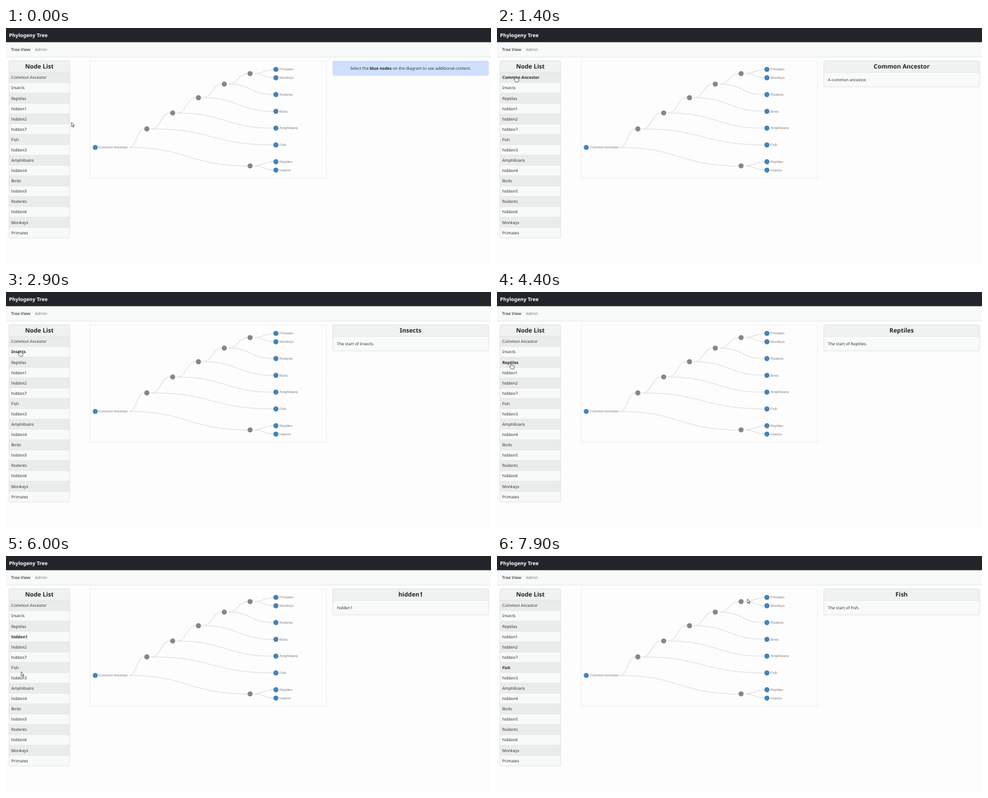
These frames come from a looping animation (800 by 390 pixels, 8 s). An HTML page:

```html
<!DOCTYPE html>
<html lang="en">
<head>
<meta charset="utf-8">
<title>Phylogeny Tree</title>
<style>
  html, body { margin: 0; width: 100%; height: 100%; overflow: hidden; background: #fdfdfd; }
  svg { display: block; width: 100%; height: 100%; }
  text {
    font: 6.667px "Noto Sans", "Open Sans", sans-serif;
    fill: #303336;
    text-rendering: geometricPrecision;
    white-space: pre;
  }
  .bold { font-weight: 700; fill: #212529; }
  .title { font-size: 10px; font-weight: 700; fill: #212529; }
  .mid { text-anchor: middle; }
  .brand { font-size: 8.333px; font-weight: 700; fill: #fff; }
  .label { font: 5.833px "Liberation Sans", Arial, sans-serif; fill: #808080; }
</style>
</head>
<body>
<svg id="stage" viewBox="0 0 800 390"></svg>
<script>
const stage = document.getElementById('stage');
const LOOP = 8000, STEP = 100;
const LEFT = 5, TOP = 54.3, HEAD = 19, ROW = 41 / 2.4;
const EDGE = '#d9dada';

function add(parent, tag, attrs, text) {
  const el = document.createElementNS('http://www.w3.org/2000/svg', tag);
  for (const key in attrs) el.setAttribute(key, attrs[key]);
  if (text) el.textContent = text;
  return parent.appendChild(el);
}
const box = (parent, x, y, width, height, fill, more) =>
  add(parent, 'rect', { x, y, width, height, fill, ...more });
const write = (parent, x, y, text, cls = '') =>
  add(parent, 'text', { x, y, class: cls }, text);
const line = (parent, d, stroke, width) =>
  add(parent, 'path', { d, fill: 'none', stroke, 'stroke-width': width });

// Page bars
box(stage, 0, 0, 800, 23.7, '#212529');
box(stage, 0, 23.7, 800, 24.3, '#f8f9f9');
line(stage, 'M0 48H800', '#dfe0e0', 0.7);
write(stage, 5, 15.1, 'Phylogeny Tree', 'brand');
write(stage, 8.3, 38.2, 'Tree View', 'bold').style.fill = '#555759';
write(stage, 47.5, 38.2, 'Admin').style.fill = '#777879';

// Card with a title bar; returns its group
function card(x, width, height) {
  const g = add(stage, 'g', {});
  box(g, x, TOP, width, height, '#f8f9f9', { rx: 2 });
  box(g, x, TOP, width, HEAD, '#f0f1f1', { rx: 2 });
  line(g, `M${x} ${TOP + HEAD}h${width}`, EDGE, 0.6);
  return g;
}
const frame = (g, x, width, height) =>
  box(g, x, TOP, width, height, 'none', { rx: 2, stroke: EDGE, 'stroke-width': 0.7 });

// Node list
const names = ['Common Ancestor', 'Insects', 'Reptiles', 'hidden1', 'hidden2', 'hidden7',
  'Fish', 'hidden3', 'Amphibians', 'hidden4', 'Birds', 'hidden5', 'Rodents', 'hidden6',
  'Monkeys', 'Primates'];
const listHeight = HEAD + names.length * ROW + 0.4;
const list = card(LEFT, 100, listHeight);
write(list, LEFT + 50, 67.4, 'Node List', 'title mid');
const rows = names.map((name, i) => {
  const y = TOP + HEAD + i * ROW;
  if (i % 2 === 0) box(list, LEFT, y, 100, ROW, '#eaebeb');
  line(list, `M${LEFT} ${y}h100`, '#dedfdf', 0.5);
  const el = write(list, 8.7, y + 11.1, name);
  return { el, mid: y + ROW / 2, right: 8.7 + el.getComputedTextLength() };
});
frame(list, LEFT, 100, listHeight);

// Tree
box(stage, 138.7, 54.3, 389.8, 194.3, 'none',
  { stroke: '#d4d4d4', 'stroke-width': 0.7, 'stroke-dasharray': '1.3 1.2' });
const links = add(stage, 'g', {}), dots = add(stage, 'g', {});
const leaf = (name, slot) => ({ name, y: 68.4 + 13.87 * slot, depth: 7, leaf: true });
const join = (depth, a, b, name = '') => ({ name, depth, y: (a.y + b.y) / 2, kids: [a, b] });

let clade = leaf('Primates', 0);
['Monkeys', 'Rodents', 'Birds', 'Amphibians', 'Fish'].forEach((name, i) => {
  clade = join(6 - i - (i > 0 ? 0 : 0), clade, leaf(name, 2 * i + 1));
});
clade.depth = 2;
const root = join(0, clade, join(6, leaf('Reptiles', 11), leaf('Insects', 12)), 'Common Ancestor');

function drawNode(node) {
  const x = 147.2 + 42.57 * node.depth, y = node.y;
  add(dots, 'circle', { cx: x, cy: y, r: 4.2, fill: node.name ? '#4682b4' : '#868686' });
  let start = x + 7.5;
  if (node.name) {
    start += write(dots, x + 5.9, y + 1.8, node.name, 'label').getComputedTextLength();
  }
  for (const kid of node.kids || []) {
    const end = 147.2 + 42.57 * kid.depth - 4, half = (start + end) / 2;
    line(links, `M${start} ${y}C${half} ${y} ${half} ${kid.y} ${end} ${kid.y}`, '#e2e2e2', 1.25);
    drawNode(kid);
  }
}
drawNode(root);

// Detail panel and hint
const panel = card(539, 257, 43);
frame(panel, 539, 257, 43);
const title = write(panel, 667.4, 67.4, '', 'title mid');
const detail = write(panel, 546, 87.9, '');

const hint = add(stage, 'g', {});
box(hint, 539, 54.4, 257, 24, '#cfe0fe', { rx: 2, stroke: '#bcd4f8', 'stroke-width': 0.5 });
const tip = write(hint, 667.4, 68.8, '', 'mid');
add(tip, 'tspan', {}, 'Select the ');
add(tip, 'tspan', { class: 'bold' }, 'blue nodes');
add(tip, 'tspan', {}, ' on the diagram to see additional content.');

// Pointer shapes, hotspot at the origin
const ink = { fill: '#fff', stroke: '#333', 'stroke-width': 0.75, 'stroke-linejoin': 'round' };
const arrow = add(stage, 'path', { d: 'M0 0V7L1.6 5.5 2.7 8 3.8 7.5 2.7 5.1H4.9Z', ...ink });
const hand = add(stage, 'path', {
  d: 'M-1 4.8V.7Q-1-.3-.1-.3T.8.7V3.2Q1.6 2.7 2.3 3.4 3.1 3 3.7 3.8 4.7 3.5 4.9 4.6V6.5' +
     'Q4.9 8 4 9.2H-.2Q-1.2 7.6-2.7 5.9-2.9 4.6-1.9 4.6Z', ...ink });

// Pointer path: time, x, y
const path = [
  [0, 108, 156], [400, 46, 157], [500, 46, 157], [1200, 31, 80], [2200, 31, 80],
  [2700, 23, 97], [3200, 23, 97], [3600, 23.5, 118], [4400, 23.5, 118], [4900, 30, 134],
  [5100, 30, 134], [5300, 42, 150], [5600, 38, 186], [5900, 27, 199], [6100, 23, 184],
  [7000, 23, 184], [7200, 52, 194], [7700, 393, 78], [7800, 393, 78], [7900, 413, 71]
];
// Panel changes: time, row
const picks = [[1400, 0], [2900, 1], [4000, 2], [5100, 3], [6300, 6]];

function pointerAt(t) {
  const i = path.findIndex(p => p[0] > t);
  if (i < 0) return path[path.length - 1].slice(1);
  const [t0, x0, y0] = path[i - 1], [t1, x1, y1] = path[i];
  const u = (t - t0) / (t1 - t0), e = u * u * (3 - 2 * u);
  return [x0 + (x1 - x0) * e, y0 + (y1 - y0) * e];
}

function describe(name) {
  if (name === names[0]) return 'A common ancestor.';
  return name.startsWith('hidden') ? name : `The start of ${name}.`;
}

function render(t) {
  const [x, y] = pointerAt(t);
  const pick = picks.filter(p => p[0] <= t).pop();
  const chosen = pick ? pick[1] : -1;
  const hover = rows.findIndex(r => x >= 8.7 && x <= r.right && Math.abs(y - r.mid) < 6);

  rows.forEach((r, i) => r.el.setAttribute('class', i === chosen || i === hover ? 'bold' : ''));
  hint.style.display = pick ? 'none' : '';
  panel.style.display = pick ? '' : 'none';
  title.textContent = pick ? names[chosen] : '';
  detail.textContent = pick ? describe(names[chosen]) : '';

  const [shown, hidden] = hover < 0 ? [arrow, hand] : [hand, arrow];
  shown.setAttribute('transform', `translate(${x} ${y})`);
  shown.style.display = '';
  hidden.style.display = 'none';
}

const begin = performance.now();
function tick() {
  const t = (performance.now() - begin) % LOOP;
  render(Math.floor(t / STEP) * STEP);
  requestAnimationFrame(tick);
}
tick();
</script>
</body>
</html>
```
